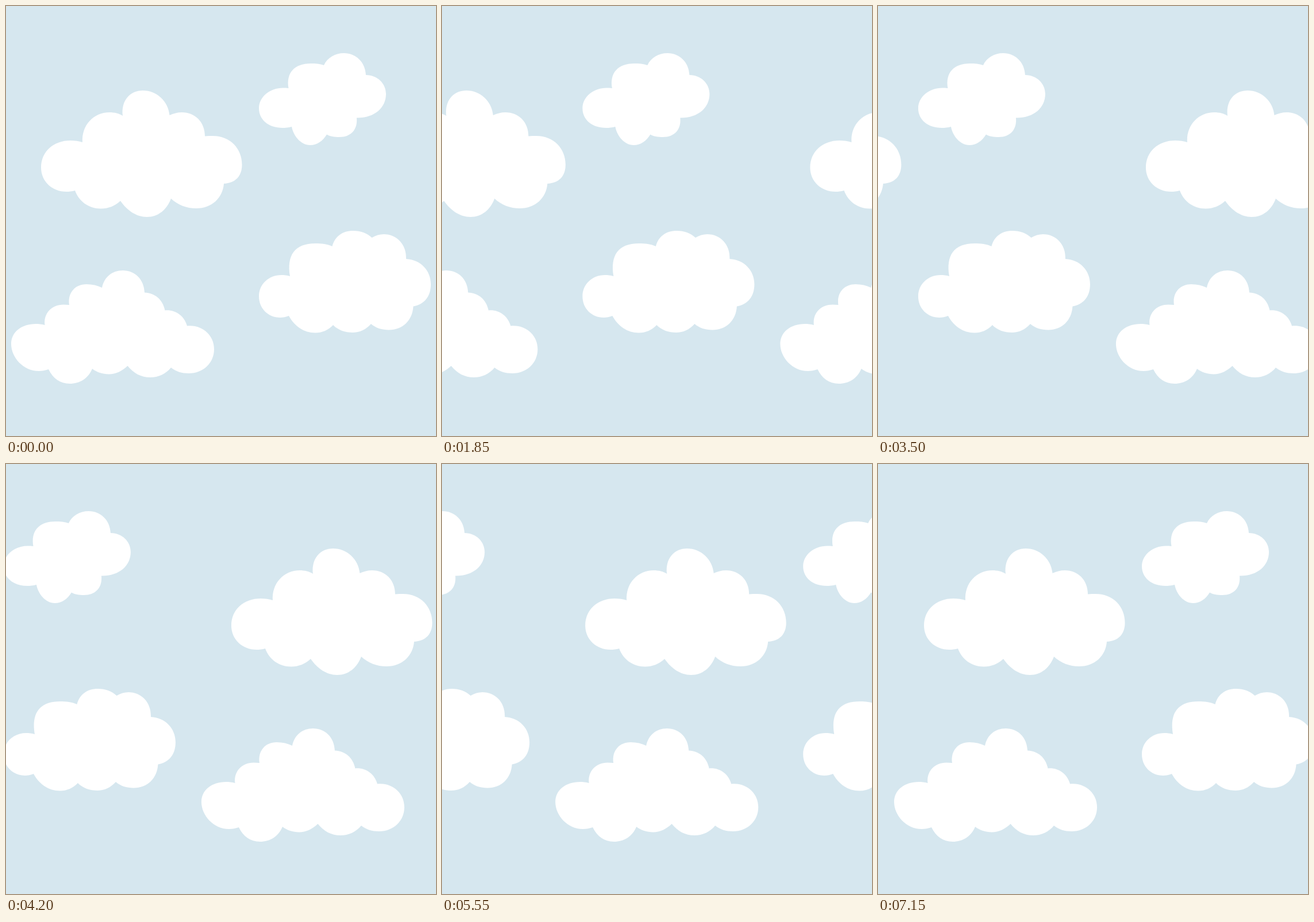
Write an HTML page with a canvas that moves like this. It is 748x748 px and loops after 7.2 s.

```html
<!DOCTYPE html>
<html lang="en">
<head>
<meta charset="utf-8">
<title>Drifting clouds</title>
<style>
  html, body { margin: 0; width: 100%; height: 100%; overflow: hidden; background: #d6e7ef; }
  canvas { display: block; width: 748px; height: 748px; }
</style>
</head>
<body>
<canvas id="sky" width="748" height="748"></canvas>
<script>
const SIZE = 748;
const LOOP = 7200;      // ms
const STEP = 50;        // ms per picture
const SPEED = 0.10573;  // px per ms, leftwards
const PERIOD = 775;     // px between repeats of the pattern

const ctx = document.getElementById('sky').getContext('2d');

const clouds = [
  // upper left
  `M120 321 C115 322.5 110 323 105 323 C80 323 61 305 61 281
   C61 253 83 234 112 234 C120 234 127 235 133 237
   C131 208 152 185 180 185 C189 185 197 187 203 191
   C200 164 216 147 238 147 C262 147 282 165 284.5 190
   C291 187 298 185 306 185 C329 185 346 202 346 226.5
   C350 226 355 226 360 226 C390 226 410.5 248 410.5 276
   C410.5 296 399 308 379 309 C377 334 358 352 331 352
   C314 352 299 346 287 335 C280 354 265 367 245 367
   C227 367 211 356 199 339 C189 348 178 352.5 165 352.5
   C144 352.5 127 340 120 321 Z`,
  // upper right
  `M497 210 C492 211.5 486 212 481 212 C457 212 440 198 440 178
   C440 158 459 142.5 482 142.5 C485 142.5 488 142.5 491.5 143
   C487 116 502 100 530 100 C538 100 546 100.5 553 103
   C559 90 572 82 588 82 C608 82 625 97 626 120
   C646 120 661 135 661 153 C661 177 641 195 610 194.5
   C612 215 600 228 580 228 C571 228 564 227 558 223.5
   C551 235 541 242 529 242 C513 242 500 226 497 210 Z`,
  // lower left
  `M74 632 C68 634 63 635 57 635 C30 635 9 611 9 588
   C9 567 27 553 52 553 C57 553 62 553.5 67.5 555
   C65 535 79 519.5 100 519.5 L110 520
   C107 499 120 484 140 484 C150 484 159 486 167 490
   C171 471 185 460 203 460 C224 460 240 475 241 498.5
   C259 499 273 511 276.5 529.5 C295 528 310 539 315 556.5
   C342 554 362 573 362 597 C362 621 343 639 318 639
   C306 639 296 636 287 629 C278 640 265 646 251 646
   C235 646 222 639 211.5 626 C202 635 191 640.5 179 640.5
   C168 640.5 158 637 150 631 C143 648 128 657 111 657
   C94 657 82 648 74 632 Z`,
  // lower right
  `M492 539 C487 541 482 542 477 542 C456 542 440 526 440 505
   C440 484 457 468 479 468 C484 468 489 468.5 494 470
   C488 434 502 413 538 413 C549 413 559 414 567.5 418
   C572 401 585 391 604 391 C617 391 628 395 636.5 403
   C643 399 650 397 657 397 C680 397 697 415 696 440
   C721 441 739 460 739 484 C739 505 728 519 708.5 522.5
   C707 547 690 563.5 666 563.5 C654 563.5 643 560 635 553
   C626 563 615 568 603 568 C590 568 578 564 569 555
   C560 564 550 568.5 538 568.5 C518 568.5 502 557 492 539 Z`
].map(d => new Path2D(d));

function drawClouds(x) {
  ctx.save();
  ctx.translate(x, 0);
  clouds.forEach(c => ctx.fill(c));
  ctx.restore();
}

function draw(time) {
  const t = Math.floor((time % LOOP) / STEP) * STEP;
  const shift = -SPEED * t;
  ctx.fillStyle = '#d6e7ef';
  ctx.fillRect(0, 0, SIZE, SIZE);
  ctx.fillStyle = '#fff';
  drawClouds(shift);
  drawClouds(shift + PERIOD);
}

let start;
function tick(now) {
  start ??= now;
  draw(Math.max(0, now - start));
  requestAnimationFrame(tick);
}
draw(0);
requestAnimationFrame(tick);
</script>
</body>
</html>
```
